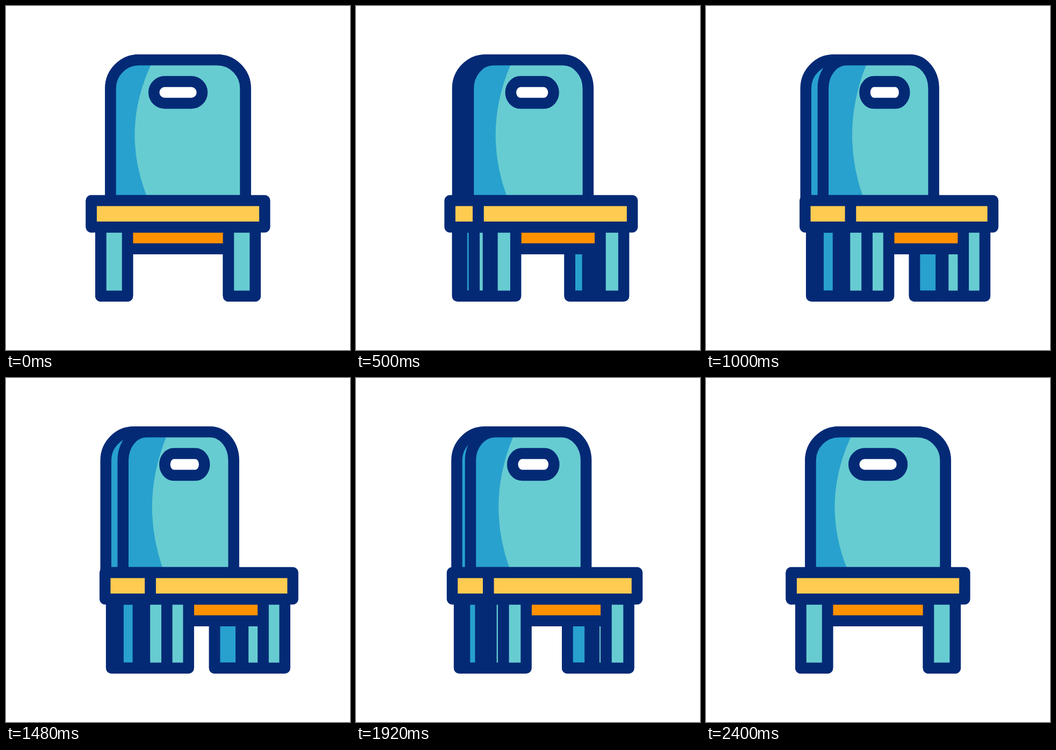
An HTML page that plays this animation: 640 px wide and 640 px high, repeating every 3.6 s.

```html
<!DOCTYPE html>
<html lang="en">
<head>
<meta charset="utf-8">
<title>Turning chair</title>
<style>
  html, body { margin: 0; width: 100%; height: 100%; overflow: hidden; background: #fff; }
  svg { display: block; width: 100%; height: 100%; }
  .line { stroke: #042a76; stroke-width: 20.5; stroke-linejoin: round; }
</style>
</head>
<body>
<svg id="stage" viewBox="0 0 640 640"></svg>
<script>
const LOOP = 3600, TURN = 1000, RETURN_AT = 1400;
const TEAL = '#67ccd1', BLUE = '#28a1ce', YELLOW = '#ffcb50', ORANGE = '#ff9100';
const stage = document.getElementById('stage');
const parts = [];

const mix = ([a, b], p) => a + (b - a) * p;

function add(tag, fill, outlined, update) {
  const el = document.createElementNS('http://www.w3.org/2000/svg', tag);
  el.setAttribute('fill', fill);
  if (outlined) el.setAttribute('class', 'line');
  stage.append(el);
  parts.push(p => {
    const attrs = update(p);
    for (const name in attrs) el.setAttribute(name, attrs[name]);
  });
}

// left, right and rx are [front view, turned view] pairs
function box(fill, left, right, top, bottom, rx = [0, 0], ry = 0) {
  add('rect', fill, true, p => {
    const x = mix(left, p);
    return { x, y: top, width: Math.max(0.1, mix(right, p) - x), height: bottom - top, rx: mix(rx, p), ry };
  });
}

const leg = (fill, left, right) => box(fill, left, right, 411.3, 539.7);

function panelPath(l, r, rx) {
  return `M${l} 362V153.3A${rx} 53 0 0 1 ${l + rx} 100.3H${r - rx}A${rx} 53 0 0 1 ${r} 153.3V362Z`;
}

function panel(fill, outlined, left, right, rx) {
  add('path', fill, outlined, p => ({ d: panelPath(mix(left, p), mix(right, p), mix(rx, p)) }));
}

// Backrest: rear shell, front panel, shade and grip
const backLeft = [194.5, 217.8], backRight = [445.5, 423.6], backRx = [53, 43.5];
panel(BLUE, true, [194.5, 185.7], [445.5, 412], [53, 52]);
panel(TEAL, false, backLeft, backRight, backRx);
add('path', BLUE, false, p => {
  const l = mix(backLeft, p), rx = mix(backRx, p);
  return {
    d: `M${l} 352V153.3A${rx} 53 0 0 1 ${l + rx} 100.3L${mix([269.3, 298], p)} 110` +
       `Q${mix([214, 249.6], p)} 231 ${mix([261.3, 291], p)} 352Z`
  };
});
panel('none', true, backLeft, backRight, backRx);
box('#fff', [275.2, 295.4], [364.9, 369.2], 140.6, 181, [20.2, 17], 20.2);

// Rear legs and the side faces of the front legs
const leftRear = [[176.5, 208.5], [226, 258]];
const rightRear = [[414, 387.9], [463.6, 437.4]];
const leftFront = [[176.5, 299.7], [226, 340]];
const rightFront = [[414, 478.8], [463.6, 518.9]];
leg(BLUE, [176.5, 196.2], [176.5, 246]);
leg(BLUE, ...leftRear);
leg(BLUE, ...rightRear);
leg(TEAL, [176.5, 246], leftFront[0]);
leg(TEAL, [414, 441], rightFront[0]);
leg('none', ...leftRear);
leg('none', ...rightRear);

// Rail, front legs and seat
box(ORANGE, leftFront[1], rightFront[0], 411.3, 451.7);
leg(TEAL, ...leftFront);
leg(TEAL, ...rightFront);
const seatEdge = [158.7, 269];
box(YELLOW, [158.7, 184.3], seatEdge, 362, 411.3);
box(YELLOW, seatEdge, [481.3, 533.8], 362, 411.3);

// Cubic easing with control points (x1, 0) and (x2, 1)
function ease(t, x1, x2) {
  if (t <= 0) return 0;
  if (t >= 1) return 1;
  let lo = 0, hi = 1, u = 0.5;
  for (let i = 0; i < 30; i++) {
    u = (lo + hi) / 2;
    const v = 1 - u;
    if (3 * v * v * u * x1 + 3 * v * u * u * x2 + u * u * u < t) lo = u; else hi = u;
  }
  return u * u * (3 - 2 * u);
}

function draw(now) {
  const t = now % LOOP;
  const p = t < RETURN_AT
    ? ease(t / TURN, 0.652, 0.245)
    : 1 - ease((t - RETURN_AT) / TURN, 0.87, 0.633);
  parts.forEach(update => update(p));
}

function tick() {
  draw(performance.now());
  requestAnimationFrame(tick);
}
tick();
</script>
</body>
</html>
```
